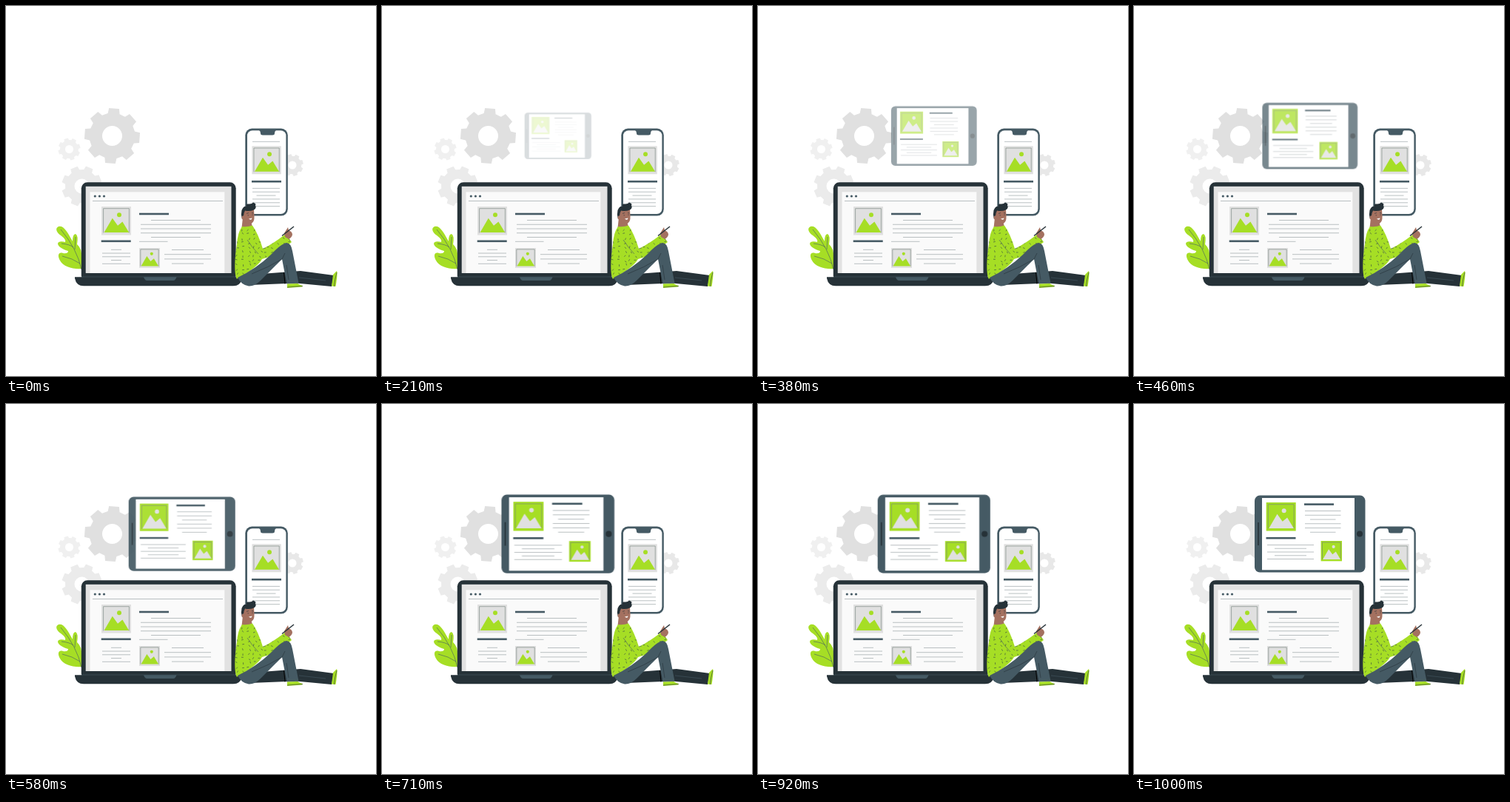
Animation, 500 px wide and 500 px high, one loop 1040 ms. Source, as an HTML page:

```html
<!DOCTYPE html>
<html lang="en">
<head>
<meta charset="utf-8">
<title>Responsive design</title>
<style>
html, body { margin: 0; width: 100%; height: 100%; overflow: hidden; background: #fff; }
svg { display: block; width: 100vw; height: 100vh; }
#tablet { transform-origin: 237.75px 175.6px; opacity: 0; }
.thin { fill: none; stroke-width: .6; }
</style>
</head>
<body>
<svg viewBox="0 0 500 500">
  <g id="gears"></g>
  <g id="leaf">
    <path fill="#a6de25" d="M103 355C90 356 77 352 73 344C69 337 71 332 77 334Q84 335 84 331C77 329 70 325 70 321Q71 317 80 319Q82 316 74 310C68 306 66 300 71 298C77 296 82 303 90 318Q90 308 94 308Q98 310 96 322Q103 328 102 340Z"/>
    <path class="thin" stroke="#455a64" d="M74 302Q96 328 102 356M75 321Q86 322 91 326M94 312L93 329M76 338Q90 341 100 348"/>
  </g>
  <g id="tablet"></g>
  <g id="phone"></g>
  <g id="laptop"></g>
  <g id="person">
    <path fill="#263238" d="M332 363L398 358L443 364L440 379L392 374.500L330 377Z"/>
    <path class="thin" stroke="#455a64" d="M396 367L432 371"/>
    <path fill="#a6de25" d="M442 363L447 358Q448.500 361 445.500 379L440 378.500Z"/>
    <path class="thin" stroke="#263238" d="M447 360Q444 370 443.500 379"/>
    <path fill="#a47160" d="M320 286L318.500 300Q326 303 333 299L331 290Z"/>
    <path id="sweater" fill="#a6de25" d="M319 298Q327 299 333 296.500Q341 308 347 328Q360 322 378 308L386 319Q366 337 346 342Q340 353 312 369C308 362 309 340 312 322Q313 306 319 298Z"/>
    <clipPath id="cut"><use href="#sweater"/></clipPath>
    <g id="weave" clip-path="url(#cut)" stroke="#3d5442" stroke-width=".7" stroke-linecap="round"></g>
    <path class="thin" stroke="#455a64" d="M326 316Q333 327 341 335M347 328L351 327"/>
    <path fill="#455a64" d="M313 367Q338 355 358 336Q372 321 379 320Q385 320 387 331L395.500 374.500L379.500 375.500L373 342Q360 355 344 371Q336 379 328 378.500Q318 377 313 367Z"/>
    <path class="thin" stroke="#263238" d="M332 362Q355 353 373 342L377 334M382 370L379 350"/>
    <path stroke="#000" d="M375.500 360L377 375.500"/>
    <path fill="#a6de25" d="M380 375.500L394 375Q397 377 401 378L400 379.500L380 381Z"/>
    <path class="thin" stroke="#263238" d="M380 380L401 378.500"/>
    <path fill="#a47160" d="M376 307L381 299L382 303Q387 305 387 309Q386 313 382 315L377 312Z"/>
    <path stroke="#263238" stroke-width="1.500" d="M373 310.500L389 298"/>
    <path fill="#a47160" d="M320 278Q326 272 335 275L335.500 284Q336 292 331 294Q324 295 320 287Z"/>
    <path fill="#263238" d="M319 288Q317 282 318.500 276Q321 270 325 271Q323 267 328 267.500Q332 268 334 265.500L336 266.500Q338 267 337 269.500Q339 273 335 275.500Q329 278 323 276.500Q321 280 321 284Z"/>
    <ellipse cx="320.500" cy="286" rx="2" ry="2.700" fill="#a47160"/>
    <path fill="#fff" d="M328 287.500L332.500 286.500Q332 290.500 328 287.500Z"/>
    <path class="thin" stroke="#263238" d="M325 280.500L328 279.500M332 279.500L334.500 280M327.200 282V283.500M333 281.500V283"/>
  </g>
</svg>
<script>
const DARK = '#263238', SLATE = '#455a64', GREEN = '#a6de25', GREY = '#e0e0e0', RULE = '#a3abae';
const byId = id => document.getElementById(id);
const range = (n, make) => Array.from({ length: n }, (_, i) => make(i));

const rect = (x, y, w, h, fill, r = 0) =>
  `<rect x="${x}" y="${y}" width="${w}" height="${h}" rx="${r}" fill="${fill}"/>`;
const dot = (x, y, r, fill) => `<circle cx="${x}" cy="${y}" r="${r}" fill="${fill}"/>`;
const path = (d, fill) => `<path d="${d}" fill="${fill}"/>`;
const line = (x, y, x2, y2, color = RULE, width = 0.75) =>
  `<path d="M${x} ${y}L${x2} ${y2}" stroke="${color}" stroke-width="${width}"/>`;
const heading = (x, y) => rect(x, y, 40, 2.6, SLATE);

// Centred text rules; one in every `period` is shorter by `inset` at both ends
const paragraph = (x, y, w, step, count, inset, period, phase = 0) =>
  range(count, i => {
    const cut = i % period === phase ? inset : 0;
    return line(x + cut, y + i * step, x + w - cut, y + i * step);
  }).join('');

function gear(cx, cy, r, hole, turn, fill) {
  const corner = (deg, k) => {
    const a = (deg + turn) * Math.PI / 180;
    return `${cx + r * k * Math.sin(a)} ${cy - r * k * Math.cos(a)}`;
  };
  const teeth = range(8, i => {
    const a = i * 45;
    return [corner(a - 15, .82), corner(a - 10.5, 1), corner(a + 10.5, 1), corner(a + 15, .82)].join('L');
  });
  const ring = `M${cx - hole} ${cy}a${hole} ${hole} 0 1 0 ${2 * hole} 0a${hole} ${hole} 0 1 0 ${-2 * hole} 0Z`;
  return `<path fill-rule="evenodd" fill="${fill}" d="M${teeth.join('L')}Z${ring}"/>`;
}

// Picture placeholder: frame, sun and two peaks
function picture(x, y, w, back, front) {
  const h = w * .963;
  const at = (u, v) => `${x + w * u} ${y + h * v}`;
  const peaks = [at(.09, .91), at(.37, .41), at(.55, .67), at(.71, .53), at(.93, .91)];
  return rect(x, y, w, h, back) +
    `<path class="thin" stroke="#6f7f78" d="M${at(.065, .92)}L${at(.065, .07)}L${at(.935, .07)}L${at(.935, .92)}"/>` +
    dot(x + w * .6, y + h * .29, w * .075, front) +
    path(`M${peaks.join('L')}Z`, front);
}

byId('gears').innerHTML =
  gear(143.5, 175.5, 37.8, 13.5, 4, GREY) +
  gear(85.5, 193.5, 15.2, 5.5, -17, '#f0f0f0') +
  gear(102.5, 243.5, 27.5, 10, 22, '#ebebeb') +
  gear(387, 215, 15, 5.5, -17, '#e8e8e8');

byId('tablet').innerHTML =
  rect(163, 123.6, 149.5, 104, SLATE, 7) +
  rect(173, 127, 125, 97.3, '#fff') +
  dot(305, 175.6, 4, DARK) +
  line(168, 160, 168, 191, DARK, 1.6) +
  picture(178.7, 133, 40, GREEN, GREY) +
  picture(252.6, 185, 28.4, GREEN, GREY) +
  heading(230, 134.3) +
  heading(178.5, 179.9) +
  paragraph(231, 144.5, 48.5, 5.75, 6, 7, 3, 2) +
  paragraph(180, 190.5, 63, 4.75, 5, 10, 2, 1);

byId('phone').innerHTML =
  rect(323.3, 165.6, 57.5, 118, SLATE, 9) +
  rect(326, 168.3, 52.4, 112.7, '#fff', 7) +
  path('M342 168H365Q363 169 363 172Q363 174.500 360 174.500H347Q344 174.500 344 172Q344 169 342 168Z', SLATE) +
  picture(332.4, 189.3, 39.4, GREY, GREEN) +
  heading(332, 235.9) +
  line(333, 183.3, 370, 183.3) +
  paragraph(333, 246.4, 37, 4.85, 6, 5.5, 4, 2);

byId('laptop').innerHTML =
  rect(101.8, 238.3, 208.9, 134, DARK, 8) +
  rect(107.7, 243.8, 196.8, 117.2, '#e2e2e2') +
  rect(113.5, 251.3, 181.8, 109.7, '#fafafa') +
  range(3, i => dot(120.3 + i * 6.1, 257, 1.6, SLATE)).join('') +
  line(117, 263.5, 293, 263.5) +
  picture(129, 271, 40, GREY, GREEN) +
  picture(180, 327, 28, GREY, GREEN) +
  heading(180, 279.7) +
  heading(128.7, 316.5) +
  paragraph(182, 289.5, 95, 5.75, 5, 14, 4) +
  line(180, 318.3, 218.5, 318.3) +
  paragraph(130, 329.3, 38, 4.75, 5, 12, 3) +
  paragraph(214, 329.5, 63, 6.2, 4, 10, 3) +
  path('M93 366.300H319V368Q317 378.300 307 378.300H105Q95 378.300 93 368Z', DARK) +
  line(102, 366, 311, 366, SLATE, .6) +
  path('M186 366.300H230.500Q229 371 226 371H190.500Q187.500 371 186 366.300Z', SLATE);

// Scattered stitches on the sweater
let seed = 7;
const rnd = () => (seed = seed * 16807 % 2147483647) / 2147483647;
byId('weave').innerHTML = range(120, i => {
  const x = 310 + (i % 10) * 8 + rnd() * 4, y = 300 + Math.floor(i / 10) * 6 + rnd() * 3;
  const a = rnd() * Math.PI;
  return `<path d="M${x} ${y}l${Math.cos(a) * 2} ${Math.sin(a) * 2}"/>`;
}).join('');

// The tablet zooms in with a slight overshoot, stepped at 24 pictures a second
const LOOP = 1040, STEP = 1000 / 24, LEAD = 30, HIDDEN_STEPS = 3;
const zoom = byId('tablet').animate(
  [{ opacity: 0, transform: 'scale(.5)' }, { opacity: 1, transform: 'scale(1)' }],
  { duration: 1000, easing: 'cubic-bezier(.36,-.01,.5,1.38)', fill: 'both' });
zoom.pause();

const start = performance.now();
function draw() {
  const t = (performance.now() - start) % LOOP;
  const step = Math.min(24, Math.floor((t + 4) / STEP));
  zoom.currentTime = step < HIDDEN_STEPS ? 0 : Math.min(1000, step * STEP + LEAD);
  requestAnimationFrame(draw);
}
draw();
</script>
</body>
</html>
```
